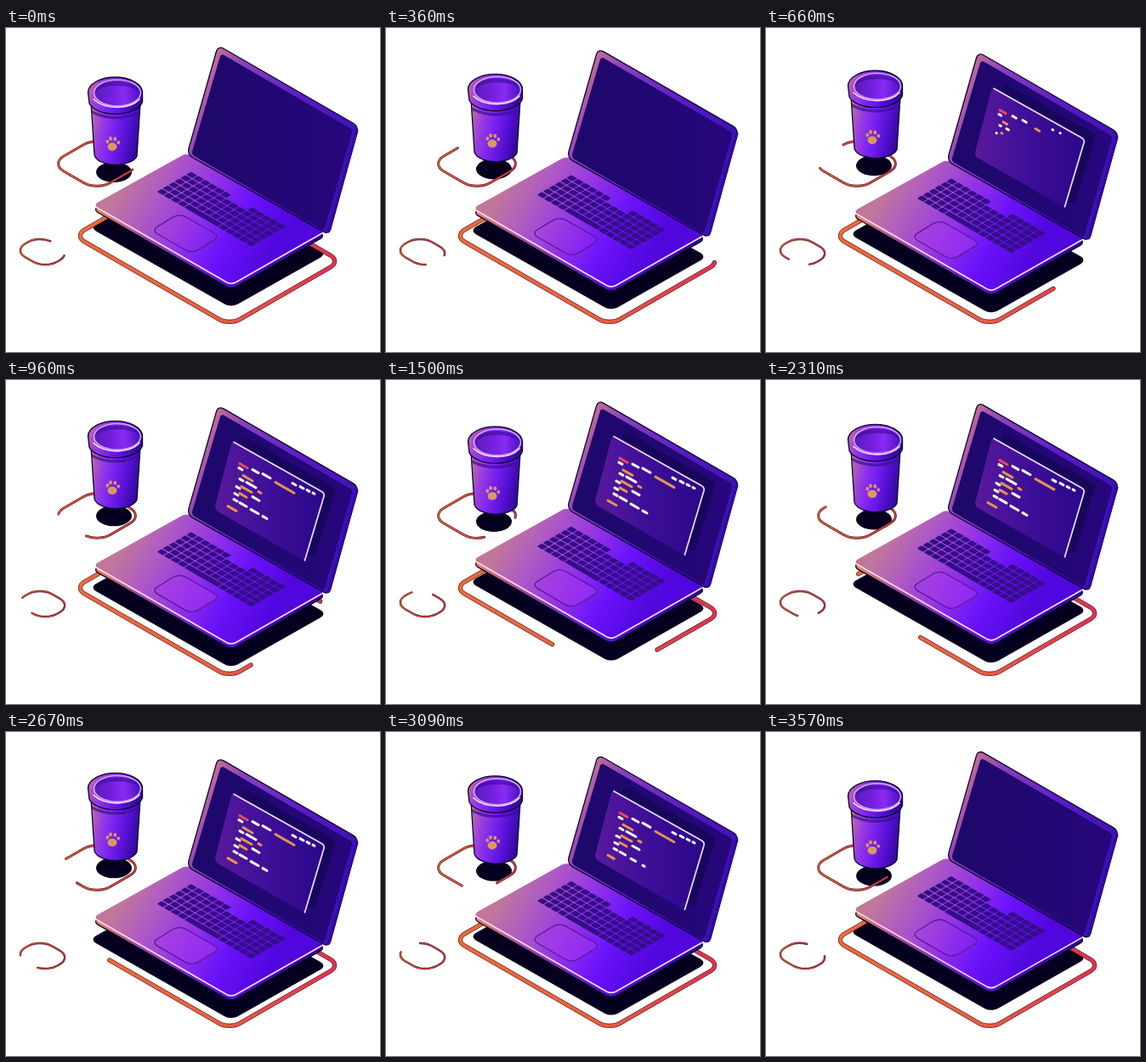
Animation, 440 px wide and 382 px high, one loop 3.63 s. Source, as an HTML page:

```html
<!DOCTYPE html>
<html lang="en">
<head>
<meta charset="utf-8">
<title>Laptop and cup</title>
<style>
  html, body { margin: 0; width: 100%; height: 100%; overflow: hidden; background: #fff; }
  svg { display: block; width: 440px; height: 382px; }
  .edge { stroke: #0c0430; stroke-width: 1.3; }
</style>
</head>
<body>
<svg viewBox="0 0 440 382" fill="none" stroke-linecap="round" stroke-linejoin="round">
  <defs>
    <linearGradient id="ringFill" gradientUnits="userSpaceOnUse" x1="86" y1="0" x2="388" y2="0">
      <stop offset="0" stop-color="#ec6a3c"/><stop offset=".5" stop-color="#e8623f"/><stop offset="1" stop-color="#e03052"/>
    </linearGradient>
    <linearGradient id="smallRing"><stop stop-color="#e0603c"/><stop offset="1" stop-color="#d03a48"/></linearGradient>
    <linearGradient id="deck" gradientUnits="userSpaceOnUse" x1="140" y1="180" x2="310" y2="275">
      <stop offset="0" stop-color="#c0779a"/><stop offset=".2" stop-color="#b05cc0"/>
      <stop offset=".45" stop-color="#9636e4"/><stop offset=".72" stop-color="#6a12fa"/><stop offset="1" stop-color="#5006dc"/>
    </linearGradient>
    <linearGradient id="side" gradientUnits="userSpaceOnUse" x1="105" y1="0" x2="372" y2="0">
      <stop offset="0" stop-color="#ee8a58"/><stop offset=".2" stop-color="#a04a9c"/>
      <stop offset=".55" stop-color="#5a10d8"/><stop offset="1" stop-color="#2b0890"/>
    </linearGradient>
    <linearGradient id="bezel" gradientUnits="userSpaceOnUse" x1="225" y1="60" x2="400" y2="150">
      <stop offset="0" stop-color="#c8748f"/><stop offset=".2" stop-color="#8a40bd"/>
      <stop offset=".6" stop-color="#5a1cc6"/><stop offset="1" stop-color="#3d10b4"/>
    </linearGradient>
    <linearGradient id="panel"><stop stop-color="#1d086a"/><stop offset="1" stop-color="#27077c"/></linearGradient>
    <linearGradient id="window"><stop stop-color="#58199c"/><stop offset=".5" stop-color="#3c0e98"/><stop offset="1" stop-color="#2a0888"/></linearGradient>
    <linearGradient id="cup" x1="0" y1=".1" x2="1" y2=".35">
      <stop offset="0" stop-color="#c4748f"/><stop offset=".24" stop-color="#9c40dc"/>
      <stop offset=".5" stop-color="#7c22f2"/><stop offset=".78" stop-color="#5610d4"/><stop offset="1" stop-color="#350aa0"/>
    </linearGradient>
    <linearGradient id="hole">
      <stop stop-color="#5c1ab8"/><stop offset=".4" stop-color="#7420e0"/>
      <stop offset=".65" stop-color="#8a2af4"/><stop offset="1" stop-color="#4a10c0"/>
    </linearGradient>
  </defs>

  <g class="cup"><ellipse cx="127" cy="170" rx="21" ry="12" fill="#04001e"/></g>
  <g class="laptop"><path data-poly="98 235 265 330 378 266 211 172" data-r="9" fill="#04001e"/></g>

  <g id="rings"></g>

  <g class="cup">
    <path class="edge" d="M100 88L104 150Q106 156 115 159Q129 164 143 159Q152 156 154 151L158 88Z" fill="url(#cup)"/>
    <path d="M101 97Q128 111 158 97L157.600 101Q128 114 101.500 101Z" fill="#3b0d98" opacity=".7"/>
    <path class="edge" d="M96.500 76A32 18 0 0 1 160.500 76V87A32 17 0 0 1 98 89Z" fill="url(#cup)"/>
    <ellipse cx="131" cy="76.500" rx="27.500" ry="15.500" fill="url(#hole)" stroke="#cfa2f4" stroke-width="1.700"/>
    <path d="M105 76Q107 64 131 63Q155 64 157 76Q150 68 131 68Q112 68 105 76Z" fill="#3a0c98" opacity=".6"/>
    <path d="M103 84Q113 93.500 131 93.500Q149 93 157 84" stroke="#f2dcff" stroke-width="1.600"/>
    <g fill="#da995e">
      <ellipse cx="125" cy="140" rx="5.500" ry="4.700"/>
      <ellipse cx="119.300" cy="134" rx="1.800" ry="2.300"/><ellipse cx="123" cy="130.500" rx="1.900" ry="2.400"/>
      <ellipse cx="128.300" cy="131" rx="1.900" ry="2.400"/><ellipse cx="132.300" cy="135" rx="1.700" ry="2.200"/>
    </g>
  </g>

  <g class="laptop">
    <path class="edge" data-poly="102 214 265 308 376 245 213 152" data-r="7" fill="url(#side)"/>
    <path data-poly="102 209 265 303 376 240 213 147" data-r="7" fill="url(#deck)"/>
    <path d="M106.500 211.500L260 300Q265 302.500 270 300L371 242.500" stroke="#f4dcff" stroke-width="1.700"/>
    <g id="keys" transform="matrix(8 4.650 -6.900 4 218 169)" fill="#340e86"/>
    <path id="pad" data-poly="171 238.500 218.500 266 252 246 204 218.500" data-r="8" fill="#a638f0" stroke="#5a1a9c" stroke-width="1.300"/>

    <path class="edge" data-poly="249.500 20.500 415 116 380 244 213 149" data-r="7" fill="url(#bezel)"/>
    <path d="M413 121L379.500 240" stroke="#3109a0" stroke-width="3"/>
    <path data-poly="253 30 408 120 374 239 218 149" data-r="4" fill="url(#panel)"/>
    <g id="screen">
      <path data-poly="280 57 388 118 363 200 255 142" data-r="4" fill="#17065c"/>
      <path data-poly="266 62 376 124 352 204 245 143" data-r="5" fill="url(#window)"/>
      <path d="M268 63.500L371 121.500Q375 123.500 374 127.500L351.500 203" stroke="#f1ddff" stroke-width="1.700"/>
      <g id="code" stroke-width="3" transform="translate(0 -1)"></g>
    </g>
  </g>
</svg>
<script>
const LOOP = 3630, STEP = 30;
const $ = id => document.getElementById(id);
const clamp = x => Math.min(1, Math.max(0, x));

function add(parent, tag, attrs) {
  const el = document.createElementNS('http://www.w3.org/2000/svg', tag);
  for (const name in attrs) el.setAttribute(name, attrs[name]);
  return parent.appendChild(el);
}

// Closed polygon whose corners are cut r pixels along each side and curved.
function roundPoly(points, r) {
  const toward = (a, b, dist) => {
    const k = dist / Math.hypot(b[0] - a[0], b[1] - a[1]);
    return [a[0] + (b[0] - a[0]) * k, a[1] + (b[1] - a[1]) * k];
  };
  const n = points.length;
  return points.map((p, i) => {
    const prev = points[(i + n - 1) % n], next = points[(i + 1) % n];
    const curve = [toward(p, prev, r * .45), toward(p, next, r * .45), toward(p, next, r)];
    return (i ? 'L' : 'M') + toward(p, prev, r) + 'C' + curve.join(' ');
  }).join('') + 'Z';
}

for (const el of document.querySelectorAll('[data-poly]')) {
  const v = el.dataset.poly.split(' ').map(Number), points = [];
  while (v.length) points.push(v.splice(0, 2));
  el.setAttribute('d', roundPoly(points, +el.dataset.r));
}

// Isometric outline, clockwise from its right corner, with one fifth left open.
function ring(cx, cy, u, v, r, width, color) {
  const dx = .433, dy = .25, sum = u + v, diff = u - v;
  const right = [cx + dx * sum, cy + dy * diff], bottom = [cx + dx * diff, cy + dy * sum];
  const left = [cx - dx * sum, cy - dy * diff], top = [cx - dx * diff, cy - dy * sum];
  const d = roundPoly([right, bottom, left, top], r);
  const group = add($('rings'), 'g', { 'stroke-dasharray': '80 20' });
  add(group, 'path', { d, pathLength: 100, stroke: '#4a1218', 'stroke-width': width + 1.2 });
  add(group, 'path', { d, pathLength: 100, stroke: color, 'stroke-width': width });
  return group;
}
const bigRing = ring(237, 260, 211, 151, 14, 4, 'url(#ringFill)');
const cupRing = ring(107, 160, 63, 63, 18, 1.7, 'url(#smallRing)');
const tinyRing = ring(43, 264, 43, 36, 16, 1.2, 'url(#smallRing)');

const key = (col, row, w = 1) =>
  add($('keys'), 'rect', { x: col + .06, y: row + .08, width: w - .12, height: .84, rx: .15 });
for (let row = 0; row < 6; row++) {
  for (let col = 0; col < 14; col++) {
    if (row === 0 && col > 5 && col < 9) continue;
    if (row === 5 && col > 3 && col < 9) continue;
    key(col, row);
  }
}
key(4, 5, 5);

// Code strokes: x, y, horizontal length.
const strokes = {
  '#ee4564': [[275, 90, 9]],
  '#ffffff': [[274, 95, 4], [290, 97, 7], [302, 102, 9], [337, 113, 4], [346, 117, 4], [354, 121, 3], [361, 124.5, 2],
    [275, 108, 4], [283, 112, 11], [271, 117, 4], [269, 125, 4], [290, 129, 8], [268, 132, 4], [275, 136, 8],
    [288, 144, 9], [302, 152, 5]],
  '#e2934f': [[317, 112, 22], [279, 104, 11], [277, 117, 12], [297, 123, 3], [275, 125, 8], [261, 140, 10]]
};
const lines = Object.entries(strokes).flatMap(([stroke, list]) => list.map(([x, y, w]) => ({
  y, el: add($('code'), 'path', { d: `M${x} ${y}l${w} ${w * .57}`, stroke, pathLength: 100 })
})));

function draw(now) {
  const t = Math.min(Math.floor(now % LOOP / STEP) * STEP, LOOP - 60);
  const phase = t * 2 / LOOP % 1;
  const bob = 5 * (1 - Math.abs(1 - 2 * phase) + (1 - Math.cos(2 * Math.PI * phase)) / 2);
  const move = (name, y) => document.querySelectorAll('.' + name)
    .forEach(el => el.setAttribute('transform', `translate(0 ${y})`));
  move('laptop', bob);
  move('cup', -bob);

  const turn = (el, start) => el.setAttribute('stroke-dashoffset', -100 * ((start + 2) % 1));
  turn(bigRing, (t - 360) / LOOP + .015);
  turn(cupRing, .09 - phase);
  turn(tinyRing, phase + .1);

  const shown = clamp((t - 420) / 200) * clamp((3500 - t) / 200);
  $('screen').setAttribute('opacity', shown);
  $('pad').setAttribute('fill-opacity', .15 + shown * .35);
  for (const { y, el } of lines) {
    const delay = (y - 90) * 4;
    const typed = clamp((t - 540 - delay) / 150) * clamp((3400 - delay - t) / 150);
    el.setAttribute('stroke-dasharray', `${typed * 100} 200`);
    el.setAttribute('visibility', typed ? 'visible' : 'hidden');
  }
}

const begin = performance.now();
(function tick() {
  draw(performance.now() - begin);
  requestAnimationFrame(tick);
})();
</script>
</body>
</html>
```
